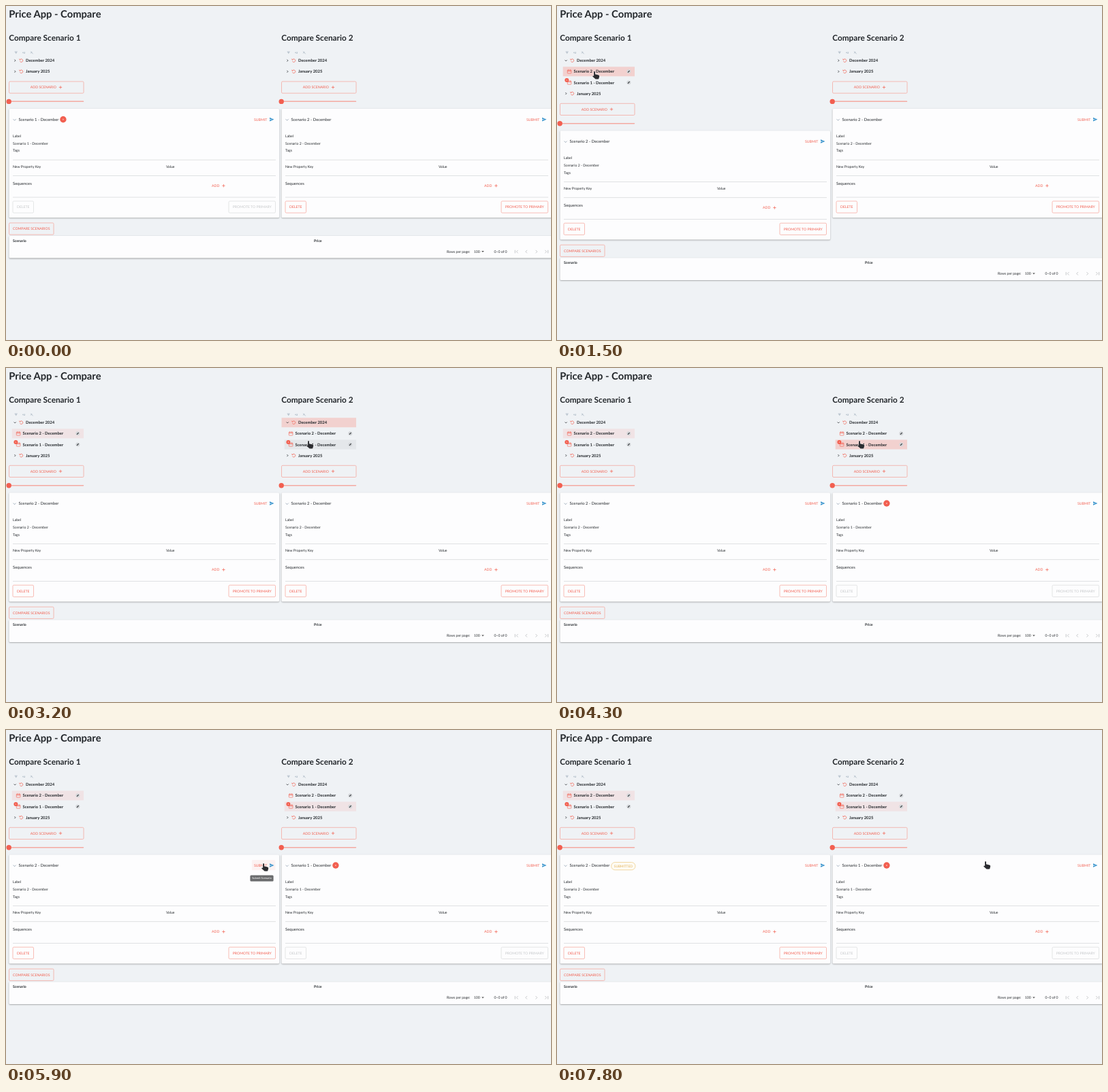
Animation, 800 px wide and 491 px high, one loop 8000 ms. Source, as an HTML page with a canvas:

```html
<!DOCTYPE html>
<html lang="en">
<head>
<meta charset="utf-8">
<title>Price App - Compare</title>
<style>
html, body { margin: 0; width: 100%; height: 100%; overflow: hidden; background: #eff2f5; }
canvas { display: block; width: 800px; height: 491px; }
</style>
</head>
<body>
<canvas id="stage"></canvas>
<script>
const LOOP = 8000, STEP = 100;
const BG = '#eff2f5', INK = '#23272b', CORAL = '#f25f50', CORAL_LINE = '#f5a197';
const MUTED = '#c6c8ca', RULE = '#d9dbdc', BLUE = '#2f8fca', STEEL = '#7b8fa1';
const DARK_PINK = '#f2d1cf', PALE_PINK = '#f0e3e5', HOVER = '#e4e7ea';
const SMALL = 5.16, BODY = 5.9, ROW = 16.15, LIST = 2 * ROW;

const canvas = document.getElementById('stage');
const ctx = canvas.getContext('2d');
const dpr = window.devicePixelRatio || 1;
canvas.width = 800 * dpr;
canvas.height = 491 * dpr;

const SEND = new Path2D('M2 21L23 12L2 3V10L17 12L2 14Z');
const HAND = new Path2D('M2.1 1.2q.9-1.3 1.9 0V4.8L9 6q1.4.4 1.2 1.8L9.5 10.8q-.2 1.2-1.2 1.2H4.6L.4 8.3q-.5-1 .6-1.3L2.1 7.3Z');

// time, x, y of the pointer tip
const POINTER = [
  [200, 260, -14], [800, 72, 80], [1000, 71, 86.5], [1300, 55, 96], [1800, 55, 96],
  [2300, 500, 92], [2600, 444.5, 77], [2800, 444.5, 77], [3200, 444, 107],
  [4600, 444, 107], [5400, 397, 193], [5700, 378, 196], [6300, 378, 196],
  [6800, 333, 199], [7200, 333, 199], [7800, 629, 193]
];

// cubic-bezier(.4, 0, .2, 1) over 300 ms
function ease(t, start) {
  const x = (t - start) / 300;
  if (x <= 0) return 0;
  if (x >= 1) return 1;
  let lo = 0, hi = 1;
  for (let i = 0; i < 24; i++) {
    const u = (lo + hi) / 2, v = 1 - u;
    if (1.2 * v * v * u + 0.6 * v * u * u + u * u * u < x) lo = u; else hi = u;
  }
  return lo * lo * (3 - 2 * lo);
}

function pointerAt(t) {
  if (t < POINTER[0][0]) return null;
  for (let i = 1; i < POINTER.length; i++) {
    const [t0, x0, y0] = POINTER[i - 1], [t1, x1, y1] = POINTER[i];
    if (t <= t1) {
      const k = (t - t0) / (t1 - t0), e = k * k * (3 - 2 * k);
      return { x: x0 + (x1 - x0) * e, y: y0 + (y1 - y0) * e };
    }
  }
  const end = POINTER[POINTER.length - 1];
  return { x: end[1], y: end[2] };
}

// y is the middle of the capitals
function text(str, x, y, size, color = INK, weight = 400, align = 'left') {
  ctx.font = `${weight} ${size}px Lato, sans-serif`;
  ctx.textAlign = align;
  ctx.fillStyle = color;
  ctx.fillText(str, x, y + size * 0.36);
}

function line(points, color, width = 0.7) {
  ctx.beginPath();
  points.forEach(([x, y], i) => i ? ctx.lineTo(x, y) : ctx.moveTo(x, y));
  ctx.strokeStyle = color;
  ctx.lineWidth = width;
  ctx.stroke();
}

function dot(x, y, r, color) {
  ctx.beginPath();
  ctx.arc(x, y, r, 0, 7);
  ctx.fillStyle = color;
  ctx.fill();
}

function box(x, y, w, h, r, fill, stroke, width = 0.7) {
  ctx.beginPath();
  ctx.roundRect(x, y, w, h, r);
  if (fill) { ctx.fillStyle = fill; ctx.fill(); }
  if (stroke) { ctx.strokeStyle = stroke; ctx.lineWidth = width; ctx.stroke(); }
}

function paper(x, y, w, h) {
  ctx.save();
  ctx.shadowColor = 'rgba(0,0,0,.36)';
  ctx.shadowBlur = 2 * dpr;
  ctx.shadowOffsetY = 0.8 * dpr;
  box(x, y, w, h, 1.5, '#fdfdfe');
  ctx.restore();
}

function rule(x, y, w) {
  ctx.fillStyle = RULE;
  ctx.fillRect(x, y - 0.4, w, 0.8);
}

function plus(x, y) {
  line([[x - 2.2, y], [x + 2.2, y]], CORAL);
  line([[x, y - 2.2], [x, y + 2.2]], CORAL);
}

function chevron(x, y, size, turn, color, width) {
  ctx.save();
  ctx.translate(x, y);
  ctx.rotate(turn * Math.PI / 2);
  line([[-size / 2, -size], [size / 2, 0], [-size / 2, size]], color, width);
  ctx.restore();
}

function button(str, x, y, w, off) {
  box(x, y - 8.6, w, 17.2, 1.5, null, off ? RULE : CORAL_LINE);
  text(str, x + w / 2, y, SMALL, off ? MUTED : CORAL, 400, 'center');
}

function toolbar(x) {
  [2, 1.3, 0.6].forEach((w, i) => line([[x + 14.7 - w, 67.2 + i * 1.2], [x + 14.7 + w, 67.2 + i * 1.2]], STEEL, 0.5));
  text('+z', x + 23.7, 68.5, 4.4, STEEL);
  line([[x + 36.3, 66.8], [x + 39.6, 70.4]], STEEL, 0.5);
  line([[x + 36.2, 69.6], [x + 37.9, 67.4]], STEEL, 0.5);
}

function cycle(x, y) {
  ctx.beginPath();
  ctx.arc(x, y, 2.3, -2.3, 2.7);
  ctx.strokeStyle = CORAL;
  ctx.lineWidth = 0.7;
  ctx.stroke();
  line([[x - 2.7, y - 2.6], [x - 2.4, y - 0.9], [x - 0.8, y - 1.3]], CORAL);
}

function monthRow(x, y, label, open) {
  chevron(x + 13.2, y, 1.5, open ? 1 : 0, INK, 0.8);
  cycle(x + 22.4, y);
  text(label, x + 29, y, BODY, INK, 700);
}

function scenarioRow(x, y, n) {
  box(x + 15.3, y - 2.3, 5.6, 5, 0.6, null, CORAL, 0.6);
  line([[x + 15.3, y - 0.8], [x + 20.9, y - 0.8]], CORAL, 0.8);
  line([[x + 16.6, y - 3.1], [x + 16.6, y - 2]], CORAL, 0.6);
  line([[x + 19.6, y - 3.1], [x + 19.6, y - 2]], CORAL, 0.6);
  if (n === 1) {
    dot(x + 14.4, y - 3.4, 3, CORAL);
    dot(x + 14.4, y - 3.4, 0.8, '#f9b8b0');
  }
  text(`Scenario ${n} - December`, x + 24.6, y, BODY, INK, 700);
  dot(x + 105.3, y, 3, '#d3d6d9');
  line([[x + 104, y + 1.3], [x + 106.6, y - 1.3]], '#34383c', 1.2);
}

function tree(x, open, pick, tone, tip) {
  const rowY = i => 80.2 + i * ROW;
  const fill = (i, color) => {
    const inset = open && (i === 1 || i === 2) ? 8.7 : 4.5;
    ctx.fillStyle = color;
    ctx.fillRect(x + inset, rowY(i) - 7, 114 - inset, 14);
  };
  const over = tip && tip.x > x + 4.5 && tip.x < x + 114 ? Math.round((tip.y - 80.2) / ROW) : -1;
  const hot = over >= 0 && over < (open ? 4 : 2) && Math.abs(tip.y - rowY(over)) < 7 ? over : -1;
  const paint = i => {
    if (i === pick) fill(i, tone);
    else if (i === hot) fill(i, HOVER);
  };
  paint(0);
  monthRow(x, rowY(0), 'December 2024', open > 0);
  if (open) {
    ctx.save();
    ctx.beginPath();
    ctx.rect(x, 88, 120, LIST * open);
    ctx.clip();
    [2, 1].forEach((n, i) => { paint(i + 1); scenarioRow(x, rowY(i + 1), n); });
    ctx.restore();
  }
  if (!open || open === 1) paint(open ? 3 : 1);
  monthRow(x, rowY(1) + LIST * open, 'January 2025', false);
}

function card(x, top, n, fold, sent, hover) {
  const h = 160.2 - 132.7 * fold, y = top + 15.7 - 2.2 * fold;
  paper(x + 4.5, top, 396.5, h);
  chevron(x + 12.6, y + 0.6 * (1 - fold), 2 - 0.3 * fold, 1 - fold, STEEL, 0.7);
  text(`Scenario ${n} - December`, x + 18.4 - 3.2 * fold, y, BODY);
  if (n === 1) {
    dot(x + 83.9, y, 4.7, CORAL);
    dot(x + 83.9, y, 0.9, '#f9b8b0');
  }
  if (sent) {
    const cx = x + 97.3 - 3.2 * fold;
    box(cx - 17.7, y - 4.5, 35.4, 11.2, 5.6, '#fefbf3', '#edca80');
    text('SUBMITTED', cx, y + 1.2, 4.79, '#e2b25a', 400, 'center');
  }
  const sx = x + 364 - 2.4 * fold;
  if (hover) box(sx - 3.2, y - 8, 34.5, 15.2, 1.5, '#fcf2f2');
  text('SUBMIT', sx, y - 0.3 * fold, SMALL, CORAL);
  ctx.save();
  ctx.translate(sx + 22.4, y - 3.6);
  ctx.scale(0.307, 0.307);
  ctx.fillStyle = BLUE;
  ctx.fill(SEND);
  ctx.restore();

  if (fold < 1) {
    ctx.save();
    ctx.beginPath();
    ctx.rect(x + 4.5, top + 23, 396, Math.max(0, h - 23));
    ctx.clip();
    const at = d => top + d;
    text('Label', x + 10, at(40), SMALL);
    text(`Scenario ${n} - December`, x + 10, at(50.9), SMALL);
    text('Tags', x + 10, at(61.5), SMALL);
    rule(x + 10, at(75.2), 386);
    text('New Property Key', x + 10, at(85.2), SMALL);
    text('Value', x + 235, at(85.2), SMALL);
    rule(x + 10, at(98.4), 386);
    text('Sequences', x + 10, at(109.7), BODY);
    text('ADD', x + 302, at(113.2), SMALL, CORAL);
    plus(x + 319.4, at(113.2));
    rule(x + 10, at(130.1), 386);
    button('DELETE', x + 10, at(144.5), 30.5, n === 1);
    button('PROMOTE TO PRIMARY', x + 327, at(144.5), 68.5, n === 1);
    ctx.restore();
  }
  return y;
}

function column(x, s, tip) {
  text(`Compare Scenario ${x ? 2 : 1}`, x + 4.2, 46.5, 11.8, INK, 700);
  toolbar(x);
  tree(x, s.open, s.pick, s.tone, tip);
  const d = LIST * s.open;
  box(x + 4.5, 111 + d, 109.5, 17.2, 1.5, null, CORAL_LINE);
  text('ADD SCENARIO', x + 35.8, 119.5 + d, SMALL, CORAL);
  plus(x + 80, 119.5 + d);
  box(x + 4.2, 139.6 + d, 110, 1.5, 0.7, '#f4aaa1');
  dot(x + 4.2, 140.4 + d, 3.7, CORAL);
  return card(x, 151 + d, s.item, s.fold, s.sent, s.hover);
}

function results(d) {
  button('COMPARE SCENARIOS', 4.5, 327.5 + d, 65.5, false);
  paper(4.5, 338 + d, 800, 32.6);
  text('Scenario', 10, 345 + d, SMALL, INK, 700);
  text('Price', 452, 345 + d, SMALL, INK, 700);
  const y = 361.1 + d;
  text('Rows per page:', 647, y, SMALL);
  text('100', 686.8, y, SMALL);
  ctx.beginPath();
  ctx.moveTo(698, y - 1);
  ctx.lineTo(701.8, y - 1);
  ctx.lineTo(699.9, y + 1);
  ctx.fillStyle = '#555';
  ctx.fill();
  text('0–0 of 0', 716.4, y, SMALL);
  const gray = '#aeb1b4';
  line([[747.2, y - 2.3], [747.2, y + 2.3]], gray);
  chevron(750.4, y, 2.2, 2, gray, 0.7);
  chevron(763.8, y, 2.2, 2, gray, 0.7);
  chevron(778.6, y, 2.2, 0, gray, 0.7);
  chevron(792.4, y, 2.2, 0, gray, 0.7);
  line([[795.6, y - 2.3], [795.6, y + 2.3]], gray);
}

function draw(t) {
  ctx.setTransform(dpr, 0, 0, dpr, 0, 0);
  ctx.textRendering = 'geometricPrecision';
  ctx.fillStyle = BG;
  ctx.fillRect(0, 0, 800, 491);
  const tip = pointerAt(t);
  const hover = t >= 5700 && t < 6900;
  const left = {
    open: ease(t, 900),
    pick: t < 900 ? -1 : t < 1300 ? 0 : 1,
    tone: t < 2700 ? DARK_PINK : PALE_PINK,
    item: t < 1400 ? 1 : 2,
    fold: ease(t, 6000) - ease(t, 7000),
    sent: t >= 6200,
    hover
  };
  const right = {
    open: ease(t, 2700),
    pick: t < 2700 ? -1 : t < 3600 ? 0 : 2,
    tone: t < 5900 ? DARK_PINK : PALE_PINK,
    item: t < 3700 ? 2 : 1,
    fold: 0
  };
  text('Price App - Compare', 4.2, 11.8, 14.75, INK, 700);
  const headY = column(0, left, tip);
  column(400, right, tip);
  results(LIST * Math.max(left.open, right.open));
  if (hover) {
    box(358.4, headY + 14.4, 34.2, 9.2, 1.5, '#6b6c6e');
    text('Submit Scenario', 375.5, headY + 18.9, 4.05, '#fff', 400, 'center');
  }
  if (tip) {
    ctx.save();
    ctx.translate(tip.x - 3, tip.y - 0.5);
    ctx.strokeStyle = '#fff';
    ctx.lineWidth = 0.8;
    ctx.stroke(HAND);
    ctx.fillStyle = '#2b2c30';
    ctx.fill(HAND);
    ctx.restore();
  }
}

const begin = performance.now();
function tick() {
  const ms = (performance.now() - begin) % LOOP;
  draw(Math.floor(ms / STEP) * STEP);
  requestAnimationFrame(tick);
}
tick();
</script>
</body>
</html>
```
